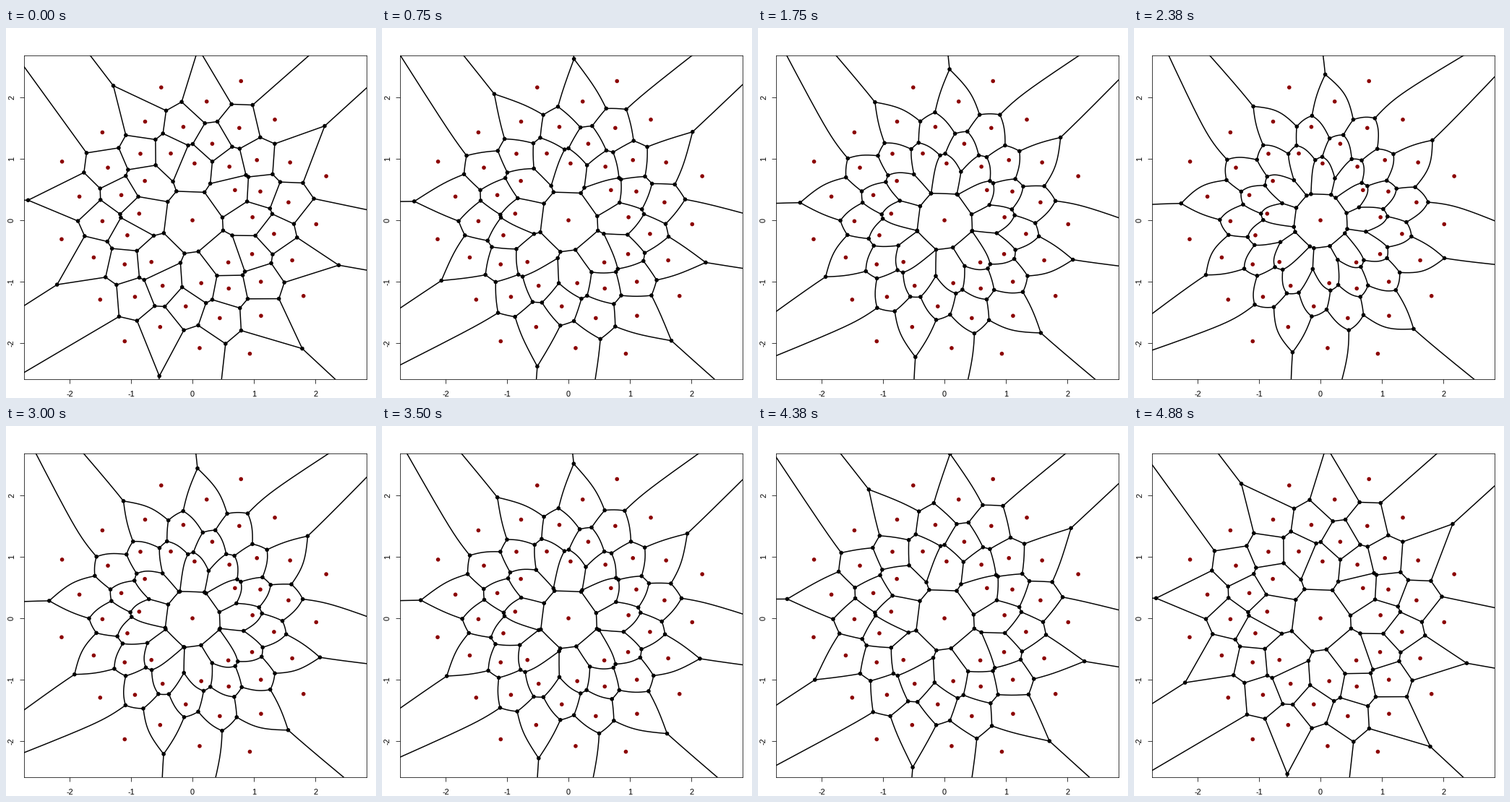
Animation of 512x512 px, one loop 5 s. Source, as a matplotlib script:

```python
import numpy as np
import matplotlib.pyplot as plt
from matplotlib.animation import FuncAnimation

# Additively weighted Voronoi diagram of a golden-angle spiral:
# the weights grow with the site's rank, then shrink back.
SIZE, DPI = 512, 64
PT = 72 / DPI                                   # points per pixel
LEFT, RIGHT, TOP, BOTTOM = 25.2, 499.2, 38.4, 486.4
X0, Y0, UNIT = 258.05, 266.1, 85.0              # origin and scale in pixels
FRAMES, LOOP = 40, 5000
HALF = FRAMES // 2 - 1
DOT = 5.6                                       # dot diameter in pixels
EPS = 1e-3

n = np.arange(50, 101)
phi = n * np.pi * (3 - np.sqrt(5))
rad = 2.4 * (n / 100) ** 1.5
sites = np.vstack([[0, 0], np.column_stack([rad * np.cos(phi), rad * np.sin(phi)])])
weights = np.linspace(0, 1, len(sites))

M = 1440
theta = np.linspace(0, 2 * np.pi, M, endpoint=False) + 1e-4
step = 2 * np.pi / M
dirs = np.vstack([np.cos(theta), np.sin(theta)])


def to_points(center, angle, inv):
    """Polar points around a site, given inverse radii; unbounded ones are NaN."""
    r = np.where(inv > EPS, 1 / np.maximum(inv, EPS), np.nan)
    return center + np.column_stack([r * np.cos(angle), r * np.sin(angle)])


def cell(i, w):
    """Edges and corners that site i shares with higher-ranked sites."""
    d = sites - sites[i]
    c = w - w[i]
    den = (d ** 2).sum(axis=1) - c ** 2
    den[i] = 1
    # inverse distance from the site to each bisector, per direction
    inv = 2 * (d @ dirs + c[:, None]) / den[:, None]
    inv[i] = -1e9
    win = inv.argmax(axis=0)

    cut = np.flatnonzero(win != np.roll(win, -1))
    nxt = (cut + 1) % M
    a, b = win[cut], win[nxt]
    g0 = inv[a, cut] - inv[b, cut]
    g1 = inv[b, nxt] - inv[a, nxt]
    t = g0 / (g0 + g1)
    angle = theta[cut] + t * step
    inv_c = inv[a, cut] * (1 - t) + inv[a, nxt] * t
    corners = to_points(sites[i], angle, inv_c)

    edges = []
    for k, m in enumerate(cut):
        j = b[k]
        if j < i:
            continue
        e = (k + 1) % len(cut)
        count = (cut[e] - m) % M
        run = (m + 1 + np.arange(count)) % M
        arc = to_points(sites[i], theta[run], inv[j, run])
        edges += [corners[k:k + 1], arc, corners[e:e + 1], [[np.nan, np.nan]]]
    bounded = np.isfinite(corners[:, 0])
    return edges, corners[(a > i) & (b > i) & bounded]


def diagram(w):
    edges, corners = [], []
    for i in range(len(sites)):
        e, v = cell(i, w)
        edges += e
        corners.append(v)
    return np.vstack(edges), np.vstack(corners)


fig = plt.figure(figsize=(SIZE / DPI, SIZE / DPI), dpi=DPI, facecolor="white")
ax = fig.add_axes([LEFT / SIZE, 1 - BOTTOM / SIZE,
                   (RIGHT - LEFT) / SIZE, (BOTTOM - TOP) / SIZE])
ax.set_xlim((LEFT - X0) / UNIT, (RIGHT - X0) / UNIT)
ax.set_ylim((Y0 - BOTTOM) / UNIT, (Y0 - TOP) / UNIT)
ax.set_autoscale_on(False)
ticks = range(-2, 3)
ax.set_xticks(ticks)
ax.set_yticks(ticks)
ax.tick_params(length=6 * PT, width=0.75 * PT, labelbottom=False, labelleft=False)
for spine in ax.spines.values():
    spine.set_linewidth(0.75 * PT)


def label(x, y, text, rotation=0):
    fig.text(x / SIZE, 1 - y / SIZE, text, rotation=rotation, rotation_mode="anchor",
             ha="center", va="baseline", family="Liberation Sans", size=11 * PT)


for v in ticks:
    label(X0 + v * UNIT, 509.6, str(v))
    label(11, Y0 - v * UNIT, str(v), 90)


def dot_sizes(points):
    # one size per dot keeps the dots at sub-pixel positions
    return np.full(len(points), (DOT * PT) ** 2)


def dots(points, color):
    return ax.scatter(*points.T, s=dot_sizes(points), color=color, linewidths=0, zorder=2)


edge_line, = ax.plot([], [], color="black", lw=1.5 * PT, solid_joinstyle="round")
corner_dots = dots(sites[:1], "black")
dots(sites, "darkred")


def update(f):
    s = min(f, FRAMES - 1 - f) / HALF
    edges, corners = diagram(weights * s)
    edge_line.set_data(*edges.T)
    corner_dots.set_offsets(corners)
    corner_dots.set_sizes(dot_sizes(corners), DPI)
    return edge_line, corner_dots


anim = FuncAnimation(fig, update, frames=FRAMES, interval=LOOP / FRAMES,
                     repeat=True, repeat_delay=0)
plt.show()
```
